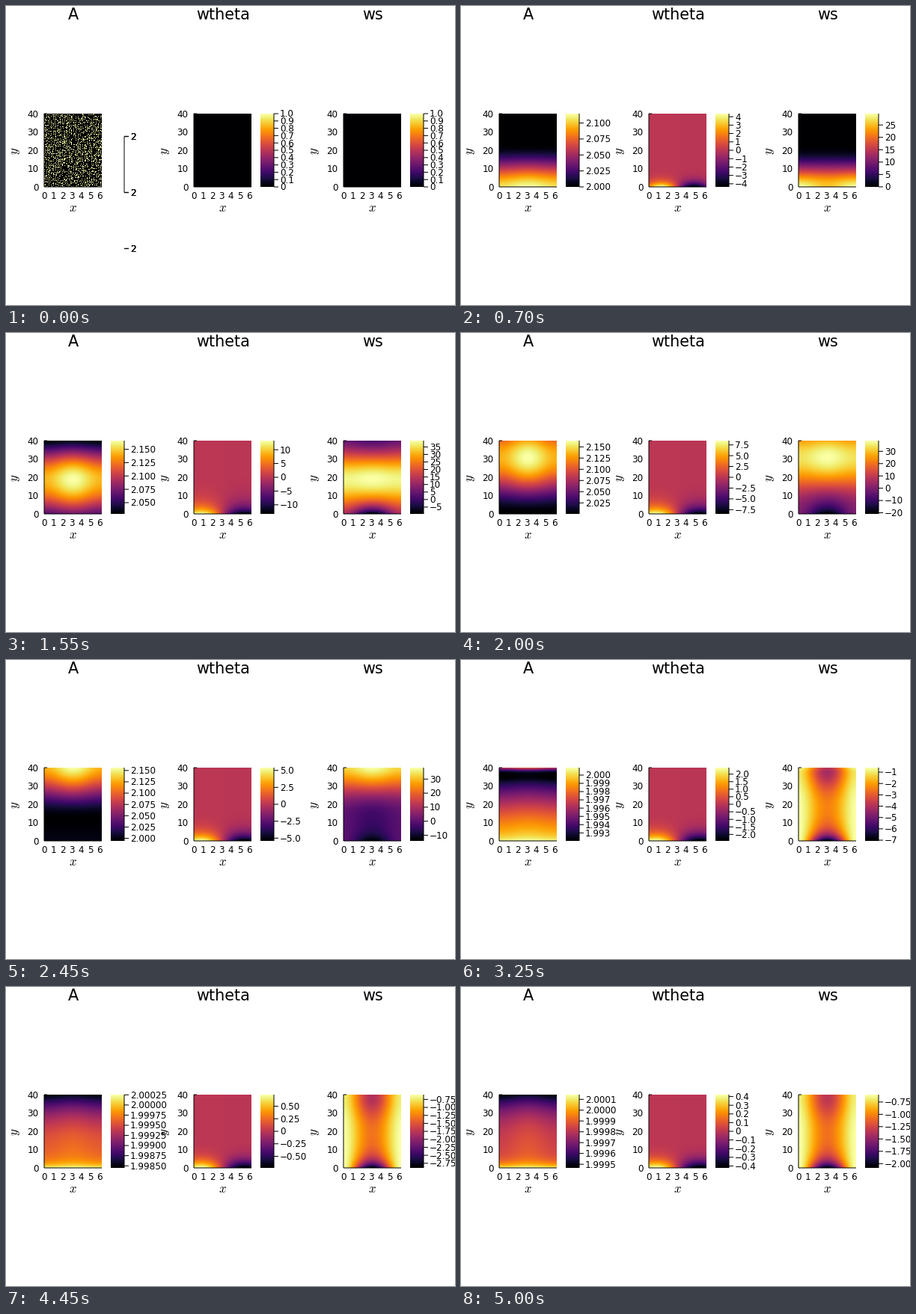
Recreate the animation shown at these times as a matplotlib script. Size 600x400 px, loop 5.05 s.

```python
import math

import numpy as np
import matplotlib.pyplot as plt
from matplotlib.animation import FuncAnimation

W, H, DPI = 600, 400, 100
FRAMES, STEP = 101, 50
TOP, BOTTOM = 144, 242
PX = 72 / DPI
NX, NY = 77, 98

plt.rcParams["font.family"] = "DejaVu Sans"
plt.rcParams["mathtext.fontset"] = "cm"

x, y = np.meshgrid((np.arange(NX) + 0.5) / NX * 2 * math.pi,
                   40 * (1 - np.arange(NY) / (NY - 1)))
G = (1 - np.cos(x)) / 2          # 0 at the side edges, 1 in the middle


def clip(v):
    return min(max(v, 0), 1)


def centre(t):
    """Height of the travelling pulse, slightly accelerating."""
    return -20 + 23.5 * t + t * t


def rear(t):
    return 26 + 14 / max(t, 0.5)


def gain(t):
    return clip(0.45 + 0.37 * t)


def drive(t):
    """Strength of the inlet: grows to 1.55 s, then decays."""
    return min((t / 1.55) ** 1.4, math.exp(1.55 - t))


def pulse(t):
    d = y - centre(t)
    u = np.where(d > 0, d / (24 + 4 * t), -d / rear(t))
    return np.cos(math.pi / 2 * np.minimum(u, 1)) ** 2


def area(t):
    c = centre(t)
    late = max(t - 3.25, 0)
    wake = clip((c - 15) / 40)
    side = 0.07 + 0.1 * clip(c / 30)

    # Undershoot left behind the pulse, with a thin layer at the inlet.
    s = np.minimum(y / min(max(c - rear(t) - 2, 1), 40), 1)
    k = 0.15 + 0.15 * late
    sag = k * (1 - np.exp(-y / 3)) + (1 - k) * s ** (1.6 + 1.2 * late)
    dip = 0.0086 * wake * math.exp(-late - 0.28 * late ** 2)
    base = 0.0009 * wake * math.exp(-1.05 * late)

    rows, cols = np.indices(x.shape)
    dots = ((cols % 3 == 0) & (rows % 2 == 0)) * np.exp(-y / 4) * G * (late > 0)
    rest = base * (0.7 + 0.3 * G - 0.25 * dots) - dip * sag
    return 2 + 0.167 * gain(t) * (1 - side + side * G) * pulse(t) + rest


def swirl(t):
    mix = min(0.8, 0.6 * t)
    f = (1 - mix) * np.sin(x) + mix * np.cos(x / 2)
    f = f * np.exp(-(y / min(4.2, 1 + 2.5 * t)) ** (1.3 - 0.3 * drive(t)))
    return 13.3 * drive(t) * f / np.abs(f).max()


def flow(t):
    c = centre(t)
    r = clip(c / 30)             # how far the return flow has set in
    side = 0.2 * r
    up = 43.5 * gain(t) * (1 - side + side * G) * pulse(t) ** 1.3
    wall = (0.25 * r + 25 * drive(t) * (0.5 + 0.5 * r)) * G * np.exp(-y / 4.3)
    back = r * (0.6 + 3 * math.exp(-0.75 * (t - 2.45)) * G ** 0.9)
    cap = 1.55 * clip((c - 45) / 20) * math.exp(-1.1 * (t - 3.25))
    return up - wall - back - cap * (G + 0.3) * np.exp(-((y - 39) / 11) ** 2)


def ticks(lo, hi, most=9):
    """Finest 1 / 2.5 / 5 step that gives no more than `most` ticks."""
    for e in range(-7, 4):
        for m in (1, 2.5, 5):
            step = m * 10.0 ** e
            a = math.ceil(lo / step - 1e-6)
            b = math.floor(hi / step + 1e-6)
            if b - a + 1 <= most:
                digits = max(0, -e + (m == 2.5))
                return [(i * step, label(i * step, digits)) for i in range(a, b + 1)]
    return []


def label(v, digits):
    if abs(v) < 1e-9:
        return "0"
    return f"{v:.{digits}f}".replace("-", "\u2212")


fig = plt.figure(figsize=(W / DPI, H / DPI), dpi=DPI, facecolor="white")
ax = fig.add_axes([0, 0, 1, 1])
ax.set_axis_off()


def line(xs, ys, width=1.0):
    return ax.plot(xs, ys, color="black", lw=width * PX, zorder=3,
                   solid_capstyle="butt", snap=False)[0]


def text(px, py, s, size=12, ha="center", **kw):
    return ax.text(px, py, s, fontsize=size * PX, ha=ha, color="black", zorder=4,
                   va=kw.pop("va", "baseline"), **kw)


def image(data, left, right):
    return ax.imshow(data, cmap="inferno", extent=(left, right, BOTTOM, TOP),
                     interpolation="nearest", aspect="auto", zorder=1)


class Panel:
    def __init__(self, left, title, field):
        self.field = field
        self.left = left
        self.map = image(np.zeros((NY, NX)), left + 51, left + 128)
        self.bar = image(np.linspace(1, 0, NY)[:, None], left + 140, left + 158)
        self.axis = line([left + 158] * 2, [TOP, BOTTOM])
        self.marks = line([], [])
        self.labels = [text(left + 166, 0, "", ha="left") for _ in range(11)]
        text(left + 89.8, 18.3, title, 20.8)
        line([left + 51] * 2, [TOP, BOTTOM])
        line([left + 51, left + 128], [BOTTOM] * 2)
        line([left + 51, left + 55], [TOP] * 2)
        for k in range(7):
            text(left + 51.3 + k * 12.25, 258.4, str(k))
        for k in range(5):
            text(left + 43.5, 246.6 - k * 24.4, str(10 * k), ha="right")
        text(left + 89.5, 270.2, "$x$", 17, va="center")
        text(left + 12.3, 193.5, "$y$", 17, va="center", rotation=90)

    def scale(self, lo, hi, most=9):
        xs, ys = [], []
        marks = ticks(lo, hi, most)
        for i, t in enumerate(self.labels):
            t.set_visible(i < len(marks))
            if i < len(marks):
                v, s = marks[i]
                py = BOTTOM - (v - lo) / (hi - lo) * (BOTTOM - TOP)
                t.set_text(s)
                t.set_y(py + 4.4)
                xs += [self.left + 158, self.left + 164, np.nan]
                ys += [py, py, np.nan]
        self.marks.set_data(xs, ys)

    def show(self, t):
        data = self.field(t)
        lo, hi = data.min(), data.max()
        self.map.set_data(data)
        self.map.set_clim(lo, hi)
        self.scale(lo, hi)

    def blank(self):
        self.map.set_data(np.zeros((NY, NX)))
        self.map.set_clim(0, 1)
        self.scale(0, 1, 11)


panels = [Panel(0, "A", area), Panel(200, "wtheta", swirl), Panel(400, "ws", flow)]

# Rounding speckle and the collapsed colour scale of the uniform start.
rng = np.random.default_rng(4)
rows, cols = np.indices((NY, NX))
speckle = rng.random((NY, NX)) < np.where(rows % 2, 0.25, 0.06) * (1 + (cols % 3 == 0))
start = [line([158, 158], [174.5, 249.5])]
for py in (174.5, 249.5, 324.5):
    start.append(line([158, 164], [py, py], 1.4))
    start += [text(166 + dx, py + 4.4, "2", ha="left") for dx in (0, 0, 0.4, 0.4)]


def draw(i):
    first = i == 0
    for artist in start:
        artist.set_visible(first)
    a = panels[0]
    for artist in (a.bar, a.axis, a.marks):
        artist.set_visible(not first)
    for p in panels:
        if first:
            p.blank()
        else:
            p.show(i * STEP / 1000)
    if first:
        a.map.set_data(speckle.astype(float))
        for t in a.labels:
            t.set_visible(False)
    return []


ax.set_xlim(0, W)
ax.set_ylim(H, 0)
anim = FuncAnimation(fig, draw, frames=FRAMES, interval=STEP, repeat=True,
                     repeat_delay=0, blit=False)
plt.show()
```
